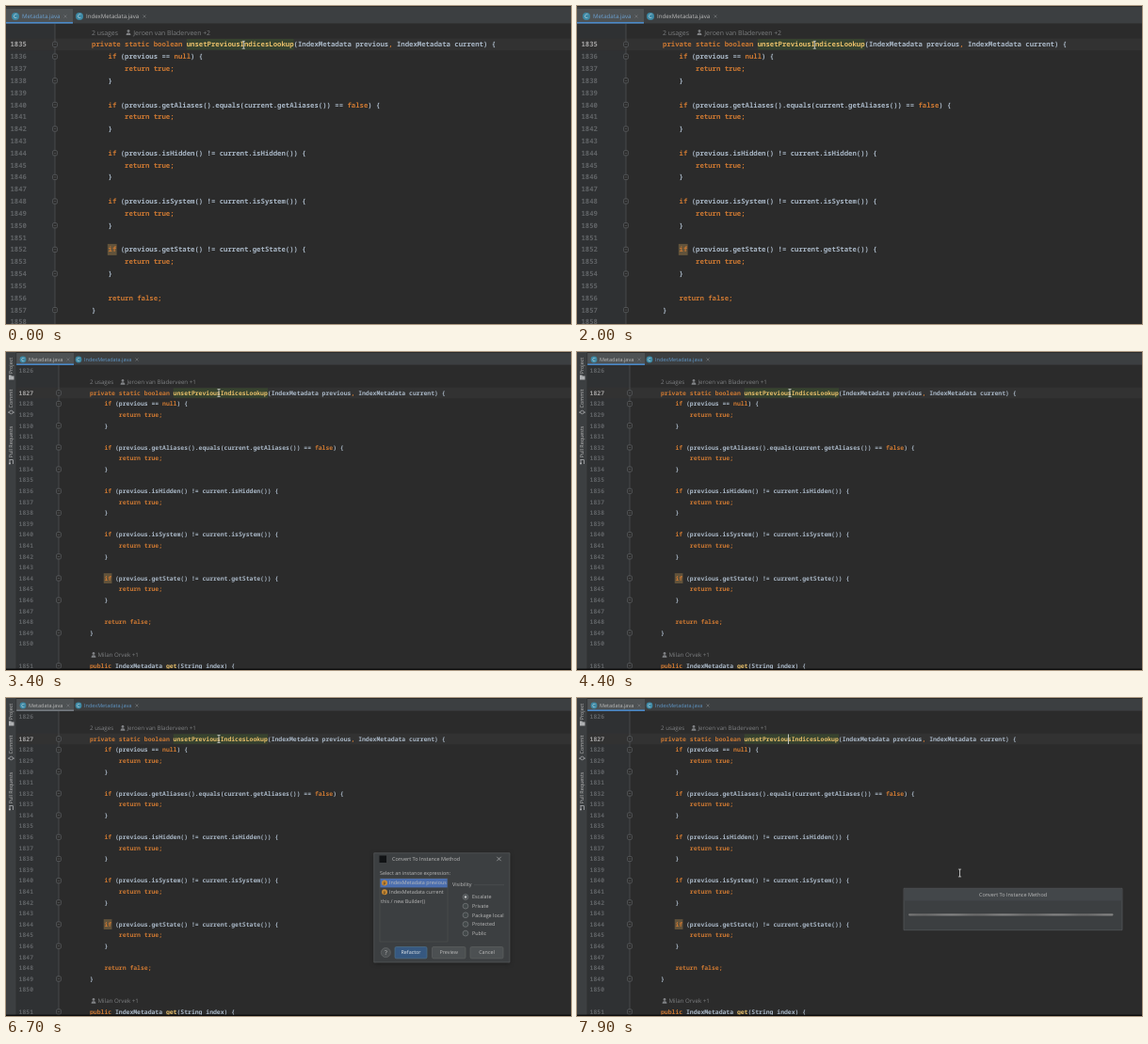
An HTML page with a canvas that plays this animation: 600 by 338 pixels, repeating every 8 s.

```html
<!DOCTYPE html>
<html lang="en">
<head>
<meta charset="utf-8">
<title>Convert to instance method</title>
<style>
html, body { margin: 0; width: 100%; height: 100%; overflow: hidden; background: #2b2b2b; }
canvas { display: block; }
</style>
</head>
<body>
<canvas id="stage" width="600" height="338"></canvas>
<script>
const g = document.getElementById('stage').getContext('2d');
g.textRendering = 'geometricPrecision';
const LOOP = 8000, CUT = 3300, DIALOG = 5500, CLOSE = 7150;
const MENU = [900, 1800];
const MONO = '"Noto Sans Mono", "DejaVu Sans Mono", monospace';
const SANS = '"Open Sans", "Noto Sans", sans-serif';
const ORANGE = '#cc7832', PLAIN = '#a9b7c6', GOLD = '#e8bf6a', DIM = '#606366', UI = '#bbbbbb';

const guard = (cond) => [`    if (${cond}) {`, '        return true;', '    }', ''];
const code = [
  'private static boolean unsetPreviousIndicesLookup(IndexMetadata previous, IndexMetadata current) {',
  ...guard('previous == null'),
  ...guard('previous.getAliases().equals(current.getAliases()) == false'),
  ...guard('previous.isHidden() != current.isHidden()'),
  ...guard('previous.isSystem() != current.isSystem()'),
  ...guard('previous.getState() != current.getState()'),
  '    return false;',
  '}'
];
const TOKENS = /\b(?:private|public|static|boolean|if|return|true|false|null)\b|[;,]|unsetPreviousIndicesLookup|\bget(?=\()|\s+|[^\s;,(]+?(?=[\s;,(])|./g;

const near = {
  x: 91, y: 40.8, pitch: 12.83, size: 7.3, first: 1835, numX: 22, left: 0, fold: 52,
  hintY: 28.2, hintSize: 6.9, hintX: 127, plus: 2,
  tabs: { top: 3, bottom: 18.6, mid: 11, size: 6.15, edge: 71, icons: [10, 78], names: [17, 85], close: [63, 147],
          colors: ['#6ba0d0', UI], r: 4 }
};
const far = {
  x: 89, y: 43.5, pitch: 11.59, size: 6.43, first: 1827, numX: 29, left: 11, fold: 56,
  hintY: 32, hintSize: 6.2, hintX: 121, plus: 1,
  tabs: { top: 1, bottom: 14, mid: 8, size: 5.5, edge: 72, icons: [18, 77], names: [24, 83], close: [66, 139],
          colors: [UI, '#5f95c5'], r: 3.4 }
};

function rect(x, y, w, h, fill) {
  g.fillStyle = fill;
  g.fillRect(x, y, w, h);
}

function box(x, y, w, h, r, fill, stroke) {
  g.beginPath();
  g.roundRect(x, y, w, h, r);
  if (fill) { g.fillStyle = fill; g.fill(); }
  if (stroke) { g.strokeStyle = stroke; g.lineWidth = 0.7; g.stroke(); }
}

function disc(x, y, r, fill, stroke) {
  box(x - r, y - r, 2 * r, 2 * r, r, fill, stroke);
}

// y is the vertical middle of the text
function text(str, x, y, size, color, font = SANS, align = 'left') {
  g.font = `${font === MONO ? 600 : 400} ${size}px ${font}`;
  g.textAlign = align;
  g.fillStyle = color;
  g.fillText(str, x, y + size * 0.35);
  return g.measureText(str).width;
}

function cross(x, y, r, color) {
  g.beginPath();
  g.moveTo(x - r, y - r); g.lineTo(x + r, y + r);
  g.moveTo(x + r, y - r); g.lineTo(x - r, y + r);
  g.strokeStyle = color;
  g.lineWidth = 0.7;
  g.stroke();
}

function codeLine(str, x, y, size) {
  for (const word of str.match(TOKENS)) {
    const method = word === 'get' || word.startsWith('unsetPrev');
    const keyword = /^(private|public|static|boolean|if|return|true|false|null|[;,])$/.test(word);
    x += text(word, x, y, size, method ? GOLD : keyword ? ORANGE : PLAIN, MONO);
  }
}

function author(name, x, y, size) {
  disc(x + 3, y - 1.6, 1.4, '#808285');
  box(x + 0.6, y + 0.3, 4.8, 2.4, [2, 2, 0, 0], '#808285');
  text(name, x + size * 1.2, y, size, '#7d7f81');
}

function tabBar(s, focused) {
  const t = s.tabs;
  rect(s.left, 0, 600 - s.left, t.bottom, '#3c3f41');
  rect(s.left, 0, 600 - s.left, 1, '#2b2b2b');
  rect(s.left, t.top, t.edge - s.left, t.bottom - t.top, '#4e5254');
  rect(s.left, t.bottom - 1.6, t.edge - s.left, 1.6, focused ? '#4a88c7' : '#747a80');
  rect(t.edge, t.bottom - 0.6, 600 - t.edge, 0.6, '#323232');
  ['Metadata.java', 'IndexMetadata.java'].forEach((name, i) => {
    disc(t.icons[i], t.mid, t.r, '#3d89a5');
    text('C', t.icons[i], t.mid, t.size, '#d5e3e8', SANS, 'center');
    text(name, t.names[i], t.mid, t.size, t.colors[i]);
    cross(t.close[i], t.mid, 1.5, '#74777a');
  });
}

function foldMark(x, y) {
  box(x - 2.4, y - 2.6, 4.8, 5.2, 1.2, '#2b2b2b', '#606366');
  rect(x - 1.2, y - 0.3, 2.4, 0.6, '#606366');
}

function editor(s, focused) {
  const rowY = (i) => s.y + i * s.pitch;
  const cw = s.size * 0.6;
  rect(0, 0, 600, 338, '#2b2b2b');
  rect(s.left, 0, s.fold - s.left, 338, '#2f3133');
  rect(s.left, s.y - s.pitch / 2, 600 - s.left, s.pitch, '#323232');
  rect(s.fold - 0.4, 0, 0.8, 338, '#4f5254');

  rect(s.x + 23 * cw, s.y - s.pitch / 2 + 0.6, 26 * cw, s.pitch - 1.2, '#37432f');
  rect(s.x + 4 * cw - 0.7, rowY(17) - s.pitch / 2 + 0.4, 2 * cw + 1, s.pitch - 0.8, '#62533b');

  code.forEach((line, i) => {
    const y = rowY(i);
    text(s.first + i, s.numX, y, s.size, i ? DIM : '#a4a3a3', MONO, 'right');
    if (/[{}]/.test(line)) foldMark(s.fold, y);
    if (line) codeLine(line, s.x, y, s.size);
  });
  text(s.first + 23, s.numX, rowY(23), s.size, DIM, MONO, 'right');
  text('2 usages', s.x, s.hintY, s.hintSize, '#7d7f81');
  author(`Jeroen van Bladerveen +${s.plus}`, s.hintX, s.hintY, s.hintSize);
  tabBar(s, focused);
}

function sideLabel(str, y) {
  g.save();
  g.translate(5.5, y);
  g.rotate(-Math.PI / 2);
  text(str, 0, 0, 5.4, UI, SANS, 'center');
  g.restore();
}

function sideBar() {
  rect(0, 0, 11, 338, '#3c3f41');
  rect(10.5, 0, 0.6, 338, '#2f3133');
  sideLabel('Project', 14.5);
  rect(3, 25.5, 5.5, 4, '#afb1b3');
  rect(3, 24.5, 2.6, 1.5, '#afb1b3');
  sideLabel('Commit', 49.5);
  rect(2, 63.7, 7, 0.8, '#afb1b3');
  disc(5.5, 64, 1.8, '#3c3f41', '#afb1b3');
  sideLabel('Pull Requests', 95.5);
  rect(3.6, 114, 0.8, 5, '#afb1b3');
  rect(7, 115, 0.8, 4, '#afb1b3');
  rect(3.6, 114, 4, 0.8, '#afb1b3');
  disc(4, 118.5, 1, '#afb1b3');
}

function farExtras(t, focused) {
  text(1826, far.numX, 20, far.size, DIM, MONO, 'right');
  author('Milan Orvek +1', 90, 322, far.hintSize);
  text(1851, far.numX, 333.5, far.size, DIM, MONO, 'right');
  foldMark(far.fold, 333.5);
  codeLine('public IndexMetadata get(String index) {', far.x, 333.5, far.size);
  sideBar();
  rect(0, 336.6, 600, 1.4, '#0c0c0c');
  if (focused && t % 1000 >= 500) rect(224, 38.5, 0.9, 10.5, '#d0d0d0');
}

function button(label, x, w, primary) {
  box(x, 264.5, w, 12.3, 1.5, primary ? '#365880' : '#4c5052', primary ? '#4c708c' : '#5e6060');
  text(label, x + w / 2, 270.6, 5.4, primary ? '#dfe5ea' : UI, SANS, 'center');
}

function dialog() {
  g.save();
  g.shadowColor = 'rgba(0,0,0,.5)';
  g.shadowBlur = 5;
  g.shadowOffsetY = 1;
  rect(390.5, 164.5, 144.7, 116.7, '#3c3f41');
  g.restore();
  box(390.8, 164.8, 144.1, 116.1, 0, null, '#55585a');
  rect(396.5, 167.5, 7.5, 7.5, '#111315');
  text('Convert To Instance Method', 410, 171, 5.5, UI);
  cross(523.5, 171, 2.2, '#b0b2b4');

  text('Select an instance expression:', 397, 186, 5.4, UI);
  box(397, 191.5, 72, 67.5, 0, '#3c3f41', '#4b4e50');
  rect(397.4, 192, 71.3, 9.4, '#4b6eaf');
  ['previous', 'current'].forEach((name, i) => {
    const y = 196.6 + i * 9.7;
    disc(402, y, 3, '#c98a35');
    text('p', 402, y - 0.4, 4.6, '#3a2c18', SANS, 'center');
    text('IndexMetadata ' + name, 407, y, 5.4, UI);
  });
  text('this / new Builder()', 398, 216, 5.4, UI);

  text('Visibility', 474, 198.5, 5.4, UI);
  rect(497, 198.5, 32, 0.6, '#515456');
  ['Escalate', 'Private', 'Package local', 'Protected', 'Public'].forEach((name, i) => {
    const y = 211.5 + i * 9.65;
    disc(488, y, 2.9, '#43494a', '#797c7e');
    if (!i) disc(488, y, 1.3, '#c4c6c8');
    text(name, 495, y, 5.4, UI);
  });

  disc(403.3, 270.6, 5, '#4c5052', '#66696b');
  text('?', 403.3, 270.6, 6.5, UI, SANS, 'center');
  button('Refactor', 413, 34, true);
  button('Preview', 452.5, 35.5);
  button('Cancel', 493, 35);
}

function progress(t) {
  box(347, 202.3, 232, 44.4, 0, '#3c3f41', '#565a5c');
  rect(347.4, 202.7, 231.2, 12.8, '#43474a');
  text('Convert To Instance Method', 463, 209, 5.5, UI, SANS, 'center');
  const shift = (t - CLOSE) / 25;
  const shine = g.createLinearGradient(352, 0, 569, 0);
  for (let i = 0; i <= 24; i++) {
    const v = 118 + 12 * Math.sin((i * 9 - shift) / 9);
    shine.addColorStop(i / 24, `rgb(${v},${v},${v})`);
  }
  box(352, 229.2, 217.5, 2.2, 1.1, shine);
}

function arrow(x, y) {
  g.beginPath();
  [[0, 0], [0, 8.8], [2, 7], [3.4, 10], [4.8, 9.4], [3.4, 6.4], [6.2, 6.3]].forEach(([dx, dy]) => g.lineTo(x + dx, y + dy));
  g.closePath();
  g.fillStyle = '#fff';
  g.fill();
  g.strokeStyle = '#111';
  g.lineWidth = 0.5;
  g.stroke();
}

function beam(x, y) {
  rect(x - 0.4, y - 4, 0.8, 8, '#d8d8d8');
  rect(x - 1.6, y - 4.3, 3.2, 0.7, '#d8d8d8');
  rect(x - 1.6, y + 3.6, 3.2, 0.7, '#d8d8d8');
}

function glide(t, from, to, a, b) {
  const u = Math.min(1, Math.max(0, (t - from) / (to - from)));
  const e = u * u * (3 - 2 * u);
  return [a[0] + (b[0] - a[0]) * e, a[1] + (b[1] - a[1]) * e];
}

const inMenu = (t) => t >= MENU[0] && t < MENU[1];

function pointer(t) {
  if (t < CUT) return inMenu(t) ? arrow(251.5, 40.4) : beam(252.3, 41.2);
  if (t >= DIALOG && t < 6450) return arrow(225.3, 41.5);
  if (t < 6750) return beam(226, 43.5);
  if (t < CLOSE) return arrow(...glide(t, 6750, 7050, [226, 43.5], [431, 271]));
  beam(...glide(t, CLOSE, 7400, [431, 271], [406.5, 186]));
}

function draw(t) {
  const inDialog = t >= DIALOG && t < CLOSE;
  const focused = !inMenu(t) && !inDialog;
  if (t < CUT) {
    editor(near, focused);
  } else {
    editor(far, focused);
    farExtras(t, focused);
    if (t >= CLOSE) progress(t);
    else if (inDialog) dialog();
  }
  pointer(t);
}

function tick() {
  draw(performance.now() % LOOP);
  requestAnimationFrame(tick);
}
tick();
</script>
</body>
</html>
```
